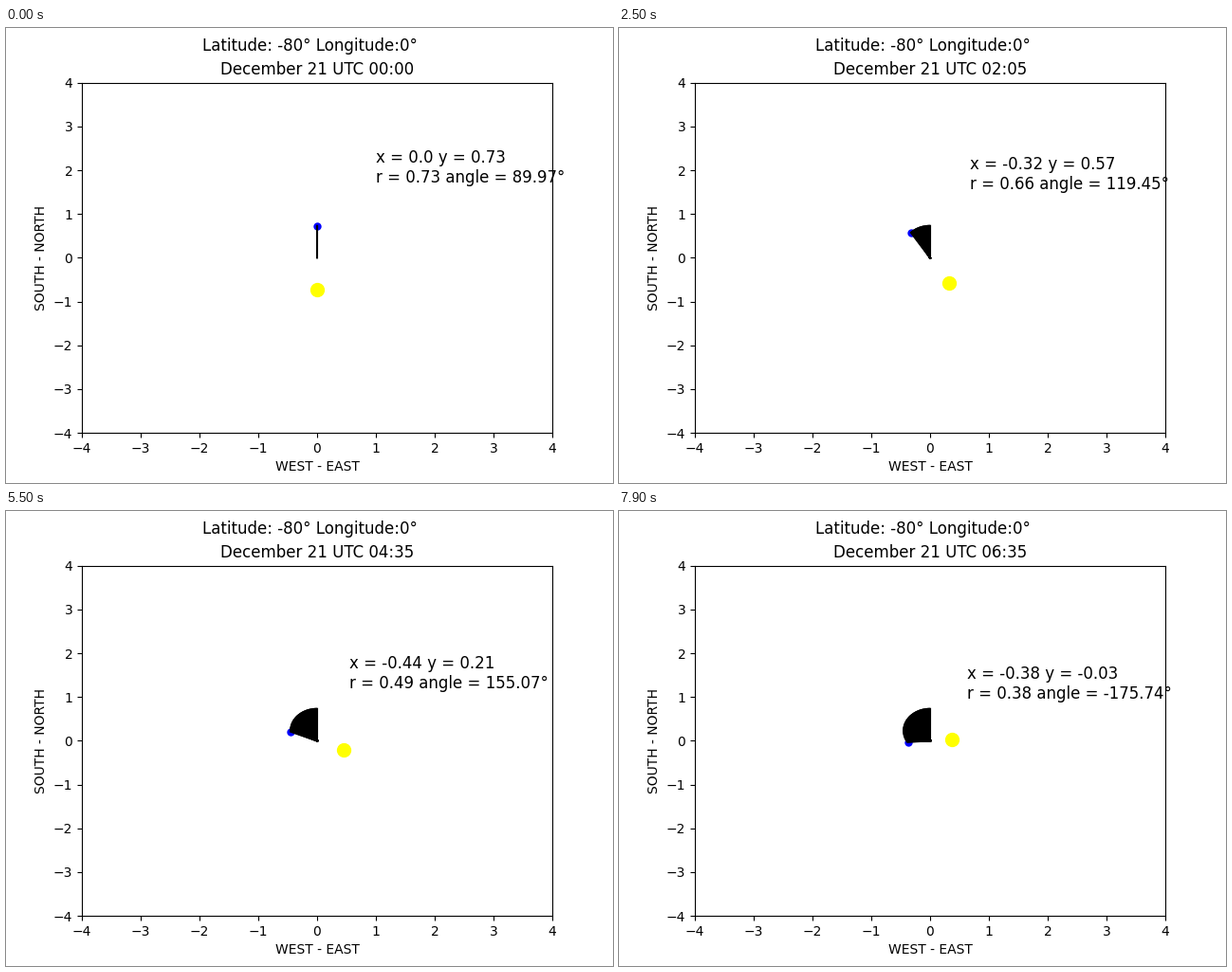
Animation of 640x480 px, one loop 8 s. Source, as a matplotlib script:

```python
import math

import matplotlib.pyplot as plt
from matplotlib.animation import FuncAnimation

FRAMES = 80
STEP_MIN = 5
LAT = math.radians(80)
DECL = math.radians(23.436)


def shadow(i):
    """Tip of the shadow, i steps of five minutes after midnight."""
    hours = i * STEP_MIN / 60
    # hour angle with the slow drift of the equation of time
    h = math.radians(15 * hours - 0.036 - 0.0031 * hours)
    azimuth = math.atan2(
        math.sin(h),
        math.cos(h) * math.sin(LAT) + math.tan(DECL) * math.cos(LAT))
    altitude = math.asin(
        math.sin(LAT) * math.sin(DECL)
        - math.cos(LAT) * math.cos(DECL) * math.cos(h))
    r = math.cos(LAT) / math.tan(altitude)
    return -r * math.sin(azimuth), r * math.cos(azimuth)


tips = [shadow(i) for i in range(FRAMES)]

plt.rcParams["font.family"] = "DejaVu Sans"
fig, ax = plt.subplots(figsize=(6.4, 4.8), dpi=100)
fig.suptitle("Latitude: -80° Longitude:0°")
ax.set(xlim=(-4, 4), ylim=(-4, 4),
       xlabel="WEST - EAST", ylabel="SOUTH - NORTH")
title = ax.set_title("")

tip_dot, = ax.plot([], [], "o", color="blue", markersize=5)
sun_dot, = ax.plot([], [], "o", color="yellow", markersize=10)
rays = [ax.plot([0, x], [0, y], color="black")[0] for x, y in tips]
label = ax.text(0, 0, "", fontsize=12)


def update(i):
    x, y = tips[i]
    hour, minute = divmod(i * STEP_MIN, 60)
    title.set_text(f"December 21 UTC {hour:02d}:{minute:02d}")

    tip_dot.set_data([x], [y])
    sun_dot.set_data([-x], [-y])
    for k, ray in enumerate(rays):
        ray.set_visible(k <= i)

    r = math.hypot(x, y)
    angle = math.degrees(math.atan2(y, x))
    label.set_position((x + 1, y + 1))
    label.set_text(f"x = {round(x, 2)} y = {round(y, 2)}\n"
                   f"r = {round(r, 2)} angle = {round(angle, 2)}°")
    return title, tip_dot, sun_dot, label, *rays


anim = FuncAnimation(fig, update, frames=FRAMES, interval=100,
                     init_func=lambda: update(0), repeat=True)
plt.show()
```
